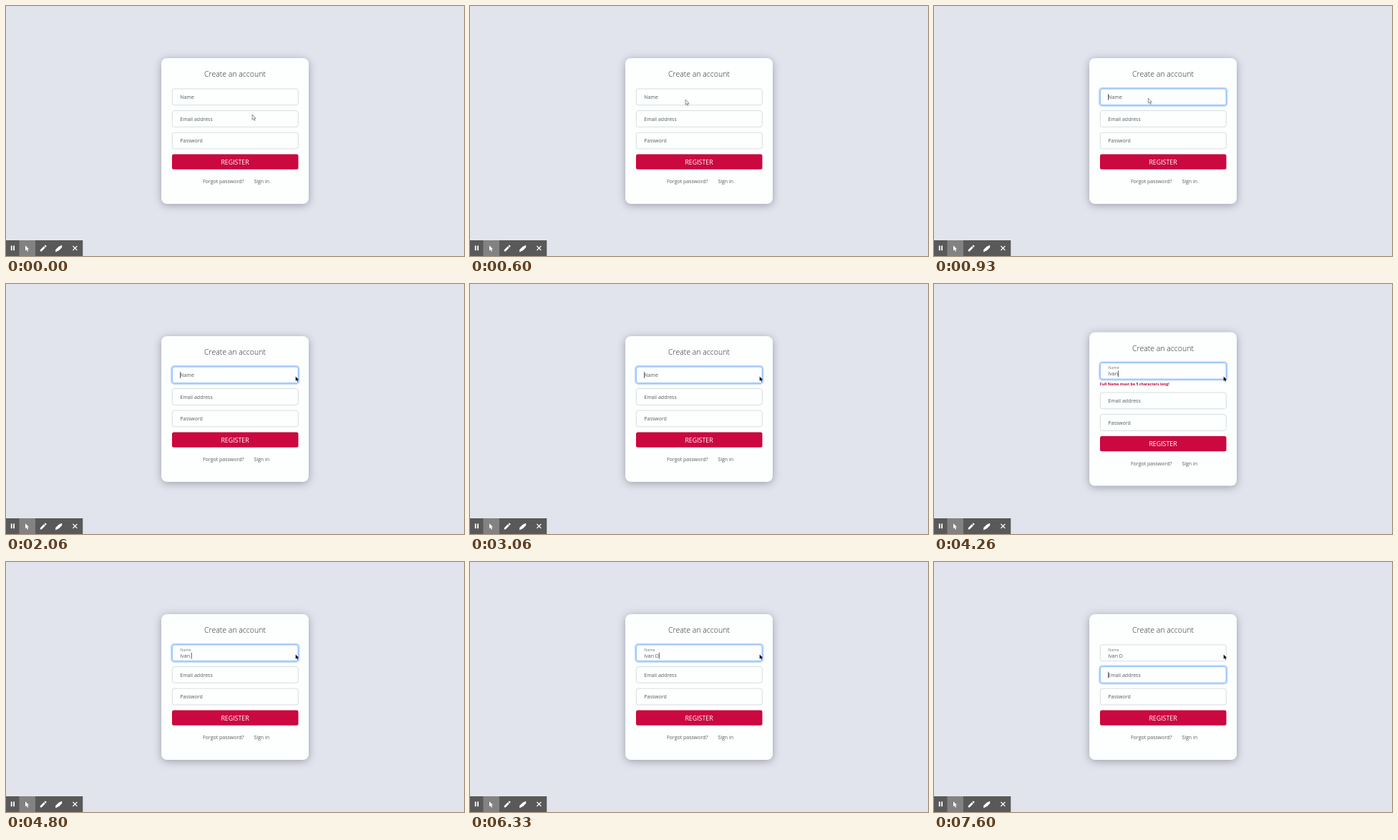
An HTML page that plays this animation: 640 by 350 pixels, repeating every 8000 ms.

```html
<!DOCTYPE html>
<html lang="en">
<head>
<meta charset="utf-8">
<title>Create an account</title>
<style>
  html, body { margin: 0; width: 100%; height: 100%; overflow: hidden; background: #e2e4ed; }
  svg { display: block; }
  text { font: 7px "Open Sans", "Noto Sans", sans-serif; fill: #555a5f; white-space: pre; }
  .title { font-size: 10.5px; font-weight: 300; fill: #25292d; }
  .error { font-size: 5.25px; font-weight: 700; fill: #b80c3c; }
  .button { font-size: 8.8px; fill: #fff; }
  .middle { text-anchor: middle; }
  #card { fill: #fcfffd; filter: drop-shadow(0 2px 6px rgba(30, 30, 50, .36)); }
  .field { fill: none; stroke: #ced5da; stroke-width: .8; }
  .ring { fill: none; stroke: #86b7fe; stroke-width: 1; }
  .glow { fill: none; stroke: #0d6efd; stroke-opacity: .25; stroke-width: 1.8; }
  #caret { fill: #333; }
  #tools { fill: #fff; }
</style>
</head>
<body>
<svg width="640" height="350" viewBox="0 0 640 350">
  <defs>
    <rect id="box" x="232.3" y="115.9" width="176" height="22.8" rx="3"/>
    <g id="focus">
      <rect class="glow" x="231" y="114.6" width="178.6" height="25.4" rx="4"/>
      <use href="#box" class="ring"/>
    </g>
    <path id="arrow" d="M0 0V7.2L1.7 5.7 2.9 8.4 4.1 7.9 2.9 5.3H5.2Z"/>
  </defs>

  <rect id="card" x="217" width="206" rx="8"/>

  <g id="upper">
    <text class="title middle" x="320" y="99">Create an account</text>
    <use href="#box" class="field"/>
    <use href="#focus" id="nameFocus"/>
    <text id="nameLabel">Name</text>
    <text id="nameValue" x="243.3" y="133.7"></text>
    <text id="error" class="error" x="231.8" y="147.2">Full Name must be 5 characters long!</text>
  </g>

  <g id="lower">
    <use href="#box" class="field" y="30.6"/>
    <use href="#focus" id="emailFocus" y="30.6"/>
    <text x="243.3" y="160.6">Email address</text>
    <use href="#box" class="field" y="61.2"/>
    <text x="243.3" y="191.2">Password</text>
    <rect x="232" y="207.5" width="176.5" height="21.2" rx="2.5" fill="#cb0840"/>
    <text class="button middle" x="320" y="221.5">REGISTER</text>
    <text x="275" y="248">Forgot password?</text>
    <text x="346.4" y="248">Sign in</text>
  </g>

  <rect id="caret" width=".8" height="8.8"/>

  <g id="tools">
    <rect y="328" width="107.3" height="22" fill="#595959"/>
    <rect x="18.5" y="328" width="22.5" height="22" fill="#828282"/>
    <path d="M6.8 335.6h1.8v6.6h-1.8zM10.2 335.6h1.8v6.6h-1.8z"/>
    <use href="#arrow" x="27" y="335.3"/>
    <path d="M47.8 343.4v-2l5.1-5.1 2 2-5.1 5.1zM53.5 335.7l1-1q.4-.4.8 0l1.2 1.2q.4.4 0 .8l-1 1z"/>
    <path d="M69.2 341.2l4.2-4.3 4.8-2.2v3.3l-4.2 4.2-4.8 2.2z"/>
    <path d="M93.4 336l6 6m0-6l-6 6" fill="none" stroke="#fff" stroke-width="1.1"/>
  </g>

  <use href="#arrow" id="pointer" stroke-linejoin="round"/>
</svg>

<script>
const LOOP = 8000, BLINK = 533, TEXT_X = 243.3;
const FOCUS_NAME = 730, FOCUS_EMAIL = 6530;
const ERROR_FROM = 3130, ERROR_TO = 4800;

// [time, field content after the key press]
const typed = [[3130, "I"], [4000, "Iv"], [4130, "Iva"], [4260, "Ivan"],
               [4800, "Ivan "], [5260, "Ivan D"]];
// [time, x, y]
const pointerPath = [[60, 344, 152], [460, 302, 133], [600, 301, 131],
                     [860, 299.3, 129], [960, 299.3, 129], [1260, 404.8, 129.8]];

const el = id => document.getElementById(id);
const set = (id, attrs) => {
  for (const name in attrs) el(id).setAttribute(name, attrs[name]);
};
const mix = (a, b, k) => a + (b - a) * k;
const ease = (t, start, length) => {
  const k = Math.min(1, Math.max(0, (t - start) / length));
  return k * k * (3 - 2 * k);
};

function pointerAt(t) {
  let [, x, y] = pointerPath[0];
  for (let i = 1; i < pointerPath.length; i++) {
    const [start] = pointerPath[i - 1], [end, nextX, nextY] = pointerPath[i];
    const k = ease(t, start, end - start);
    x = mix(x, nextX, k);
    y = mix(y, nextY, k);
  }
  return [x, y];
}

function drawCaret(t, value, lastKey, shift) {
  const inEmail = t >= FOCUS_EMAIL;
  const since = inEmail ? FOCUS_EMAIL : Math.max(FOCUS_NAME, lastKey);
  const visible = t >= since && Math.floor((t - since) / BLINK) % 2 === 0;
  const filled = value && !inEmail;
  set("caret", {
    x: TEXT_X + (filled ? el("nameValue").getComputedTextLength() : 0),
    y: inEmail ? 153.7 : (filled ? 126.8 : 123.1) - shift,
    opacity: visible ? 1 : 0
  });
}

function draw(t) {
  const hasError = t >= ERROR_FROM && t < ERROR_TO;
  const shift = hasError ? 5.5 : 0;
  const [lastKey, value] = typed.filter(key => key[0] <= t).pop() || [0, ""];

  set("card", { y: 73 - shift, height: 204 + 2 * shift });
  set("upper", { transform: `translate(0 ${-shift})` });
  set("lower", { transform: `translate(0 ${shift})` });
  set("error", { opacity: hasError ? 1 : 0 });

  const emailFocus = ease(t, FOCUS_EMAIL, 150);
  set("nameFocus", { opacity: ease(t, FOCUS_NAME, 150) - emailFocus });
  set("emailFocus", { opacity: emailFocus });

  const float = ease(t, typed[0][0], 100);
  set("nameLabel", {
    transform: `translate(${TEXT_X} ${mix(130, 124.7, float)}) scale(${mix(1, .78, float)})`,
    opacity: mix(1, .8, float)
  });
  el("nameValue").textContent = value;
  drawCaret(t, value, lastKey, shift);

  const [x, y] = pointerAt(t);
  const dark = t >= 1260;
  set("pointer", {
    transform: `translate(${x} ${y})` + (dark ? " scale(.8)" : ""),
    fill: dark ? "#000" : "#f4f4f4",
    stroke: dark ? "#000" : "#666",
    "stroke-width": dark ? .2 : .7
  });
}

function frame() {
  draw(performance.now() % LOOP);
  requestAnimationFrame(frame);
}
frame();
</script>
</body>
</html>
```
